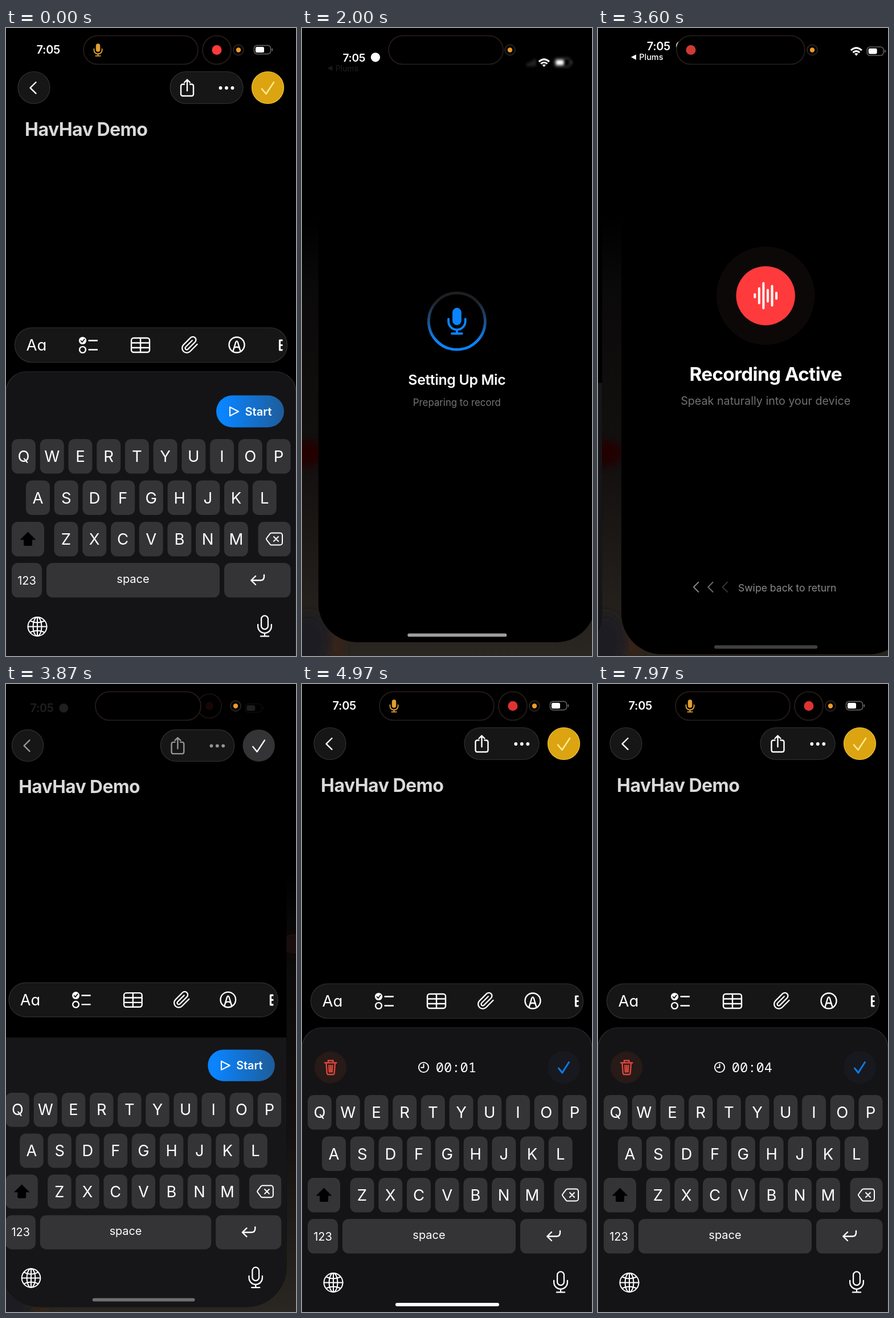
Write an HTML page that moves like this. It is 509 px wide and 1100 px high and loops after 8000 ms.

```html
<!DOCTYPE html>
<html lang="en">
<head>
<meta charset="utf-8">
<title>Voice keyboard demo</title>
<style>
  html, body { margin: 0; width: 100%; height: 100%; overflow: hidden; background: #000; }
  svg { position: fixed; inset: 0; width: 100%; height: 100%; display: block; }
  text { font-family: Inter, "Noto Sans", sans-serif; fill: #fff; }
  .line { fill: none; stroke: #fff; stroke-width: 2.4; stroke-linecap: round; stroke-linejoin: round; }
  .glass { fill: #161616; stroke: #303030; stroke-width: 1.2; }
  .time { font-size: 20px; font-weight: 600; letter-spacing: -.3px; }
  .mid { text-anchor: middle; }
  .key { fill: #343437; }
  .letter { font-size: 27.5px; text-anchor: middle; }
  .pod { fill: #000; stroke: #231918; stroke-width: 2; }
</style>
</head>
<body>
<svg viewBox="0 0 509 1100">
  <defs>
    <clipPath id="screenClip"><rect id="screenRect" width="509" height="1100"/></clipPath>
    <linearGradient id="wall" x2="0" y2="1">
      <stop offset=".3" stop-color="#000"/><stop offset=".42" stop-color="#0b0a0a"/>
      <stop offset=".72" stop-color="#141110"/><stop offset="1" stop-color="#2a2621"/>
    </linearGradient>
    <linearGradient id="blue">
      <stop offset=".1" stop-color="#0a84ff"/><stop offset="1" stop-color="#1e5c99"/>
    </linearGradient>
    <linearGradient id="spin" x2="0" y2="1">
      <stop offset=".12" stop-color="#1f1f21"/><stop offset=".5" stop-color="#1c4f86"/>
      <stop offset=".85" stop-color="#0a84ff"/>
    </linearGradient>
    <filter id="soft" x="-50%" y="-50%" width="200%" height="200%"><feGaussianBlur stdDeviation="8"/></filter>

    <g id="battery">
      <rect x="435.5" y="30.5" width="29" height="15" rx="5" fill="none" stroke="#6c6c6c" stroke-width="1.4"/>
      <rect x="438" y="33" width="15" height="10" rx="2.5" fill="#fff"/>
      <rect x="466.3" y="35.5" width="1.8" height="5" rx="1" fill="#6c6c6c"/>
    </g>
    <rect id="bar" x="164" y="1084" width="182" height="6" rx="3" fill="#fff"/>
  </defs>

  <rect width="509" height="1100" fill="#000"/>
  <g id="wallpaper">
    <rect width="509" height="1100" fill="url(#wall)"/>
    <g filter="url(#soft)">
      <ellipse cx="0" cy="745" rx="45" ry="24" fill="#210605"/>
      <ellipse cx="508" cy="455" rx="24" ry="18" fill="#1e0a0a"/>
      <ellipse cx="12" cy="1075" rx="36" ry="50" fill="#1b1d22"/>
      <ellipse cx="63" cy="1080" rx="9" ry="30" fill="#3a2216"/>
    </g>
  </g>

  <g id="editor" clip-path="url(#screenClip)">
    <rect width="509" height="1100" fill="#000"/>
    <g id="editorStatus">
      <text class="time" x="53.5" y="45">7:05</text>
      <circle id="focusDot" cx="113" cy="38" r="8" fill="#fff"/>
      <use href="#battery"/>
    </g>
    <circle class="glass" cx="49" cy="104.5" r="28"/>
    <rect id="pill" class="glass" x="288" y="76.5" width="128" height="56" rx="28"/>
    <g id="topIcons">
      <path class="line" d="M52.5 95 42.5 104.8 52.5 114.6"/>
      <path id="share" class="line" d="M313 98.5h-3a3 3 0 0 0-3 3V116a3 3 0 0 0 3 3h16a3 3 0 0 0 3-3V101.5a3 3 0 0 0-3-3h-3M318 110V91M313 95.5l5-5 5 5"/>
      <g id="dots" fill="#fff">
        <circle cx="376.5" cy="105" r="2.9"/><circle cx="387" cy="105" r="2.9"/><circle cx="397.5" cy="105" r="2.9"/>
      </g>
    </g>
    <g id="greyCheck">
      <circle cx="459.5" cy="104.5" r="28.5" fill="#343436"/>
      <path class="line" d="M449 106.5l7.5 9L470 95"/>
    </g>
    <g id="goldCheck">
      <circle cx="459.5" cy="104.5" r="28" fill="#dba410" stroke="#efc343" stroke-width="1.2"/>
      <path class="line" d="M449 106.5l7.5 9L470 95" style="stroke:#ffed9c"/>
    </g>
    <text x="33" y="188.5" font-size="32" font-weight="700" letter-spacing="-.5" style="fill:#d9d9d9">HavHav Demo</text>
    <rect id="caret" x="34.5" y="202" width="3" height="30" rx="1.5" fill="#cf962c"/>

    <rect class="glass" x="15.5" y="525" width="478" height="60.5" rx="30"/>
    <text x="35.5" y="565" font-size="27.5">A&#x251;</text>
    <circle cx="134.5" cy="547.5" r="6.6" fill="#fff"/>
    <path class="line" d="M131.5 547.8l2.2 2.4 3.8-5" style="stroke:#161616;stroke-width:1.8"/>
    <circle class="line" cx="134.5" cy="563.5" r="5.4"/>
    <path class="line" d="M145.5 547.5H160M145.5 563.5H160"/>
    <path class="line" d="M224 543h24a4 4 0 0 1 4 4v17a4 4 0 0 1-4 4h-24a4 4 0 0 1-4-4v-17a4 4 0 0 1 4-4zM236 543v25M220 551.5h32M220 560h32"/>
    <path class="line" transform="translate(306.5 539) scale(1.36)" style="stroke-width:1.7"
      d="M21.4 11l-9.2 9.2a6 6 0 0 1-8.5-8.5l9.2-9.2a4 4 0 0 1 5.7 5.7l-9.2 9.2a2 2 0 0 1-2.9-2.9l8.5-8.4"/>
    <circle class="line" cx="405" cy="555" r="13.5"/>
    <path class="line" d="M398.5 566l4.7-15.5q1.8-4 3.6 0L411.5 566M401 560q4-2.5 8 0"/>
    <path class="line" d="M485.5 547H480.5V564h5M481 555.5h4.5" style="stroke-width:3.2;stroke-linecap:butt"/>

    <g id="keyboard">
      <rect id="roundPanel" x="0" y="602" width="509" height="540" rx="36" fill="#141416" stroke="#2b2b2d" stroke-width="1.2"/>
      <rect id="flatPanel" y="622" width="509" height="480" fill="#161618"/>
      <g id="start">
        <rect x="369" y="643.5" width="119" height="56" rx="28" fill="url(#blue)"/>
        <path class="line" d="M393 664l15 7.7-15 7.7z" style="stroke-width:2.1"/>
        <text x="419.5" y="679" font-size="20" font-weight="600">Start</text>
      </g>
      <g id="controls">
        <circle cx="50" cy="671.5" r="28" fill="#271a17"/>
        <path class="line" style="stroke:#d9463d" d="M40 663.5h20.5M46 663v-3.5h8.5v3.5M42.5 664l1.3 17.5q.2 2.5 2.7 2.5h7.5q2.5 0 2.7-2.5L58 664M47.3 668l.5 11.5M50.3 668v11.5M53.3 668l-.5 11.5"/>
        <circle class="line" cx="213.5" cy="671.5" r="8.6" style="stroke-width:1.9"/>
        <path class="line" d="M213.5 666v5.8h-4.5" style="stroke-width:1.9"/>
        <text id="timer" x="234.8" y="680" font-size="23.7" font-weight="500" style="font-family:'Noto Sans Mono','DejaVu Sans Mono',monospace">00:00</text>
        <circle cx="459.5" cy="671.5" r="28.5" fill="#17191f"/>
        <path class="line" d="M450.5 673l6.3 8L468.5 662.5" style="stroke:#0f7ae5;stroke-width:3"/>
      </g>
      <g id="keys"></g>
      <path d="M38.5 882.5L52.5 896.5h-6.5v8.5q0 2-2 2h-11q-2 0-2-2v-8.5h-6.5z"/>
      <path class="line" style="stroke-width:2" d="M466 884.5h15a4 4 0 0 1 4 4v13a4 4 0 0 1-4 4h-15q-1.5 0-2.5-1.2L457.5 896.5q-1.2-1.5 0-3L463.5 885.7q1-1.2 2.5-1.2zM470 891l8 8M478 891l-8 8"/>
      <path class="line" d="M453 958v3q0 6.5-6.5 6.5H430.5M438 960l-7.7 7.5 7.7 7.5"/>
      <text class="mid" x="36.5" y="974.5" font-size="20">123</text>
      <text class="mid" x="223" y="972" font-size="20">space</text>
      <g class="line" style="stroke-width:2">
        <circle cx="55" cy="1048.5" r="16.5"/><ellipse cx="55" cy="1048.5" rx="7.5" ry="16.5"/>
        <path d="M55 1032v33M38.5 1048.5h33M42.5 1038.5q12.5 6 25 0M42.5 1058.5q12.5-6 25 0"/>
      </g>
      <g id="dictate"></g>
    </g>
    <use id="editorBar" href="#bar"/>
  </g>

  <g id="recorder" clip-path="url(#screenClip)">
    <rect width="509" height="1100" fill="#000"/>
    <text class="time" x="45" y="36">7:05</text>
    <circle cx="105" cy="28.5" r="8.5" fill="#fff"/>
    <g id="backLabel">
      <path d="M17 48.5l9-4.7v9.4z" fill="#fff"/>
      <text x="31.5" y="53.8" font-size="14.5" font-weight="500">Plums</text>
    </g>
    <g id="signal" fill="#fff">
      <rect x="383" y="39" width="4" height="6"/><rect x="389" y="36" width="4" height="9"/><rect x="395" y="32" width="4" height="13"/>
    </g>
    <path fill="none" stroke="#fff" stroke-width="3.2" d="M405 36.5q9.5-8.5 19 0M408.6 40.3q5.9-5 11.8 0"/>
    <path d="M411.3 42.5q3.2-2.3 6.4 0l-3.2 3.6z" fill="#fff"/>
    <g id="recBattery"><use href="#battery" x="-2"/></g>

    <g id="setup">
      <circle id="ring" cx="254.5" cy="512" r="51.8" fill="none" stroke="url(#spin)" stroke-width="5"/>
      <g id="setupMic"></g>
      <text class="mid" x="254.5" y="628.5" font-size="26" font-weight="600" letter-spacing="-.35">Setting Up Mic</text>
      <text class="mid" x="254.5" y="667.5" font-size="17.6" style="fill:#747474">Preparing to record</text>
    </g>
    <g id="active">
      <circle id="halo" cx="254.5" cy="468.5" r="86.5" fill="#0d0808"/>
      <circle cx="254.5" cy="468.5" r="52" fill="#ff3a3c"/>
      <g id="wave" fill="#fff"></g>
      <text class="mid" x="254.5" y="618" font-size="33.5" font-weight="700" letter-spacing="-.65">Recording Active</text>
      <text class="mid" x="254.5" y="661" font-size="19.8" style="fill:#707070">Speak naturally into your device</text>
      <g id="chevrons" class="line" style="stroke-width:2"></g>
      <text x="206" y="989" font-size="17.7" style="fill:#8a8a8a">Swipe back to return</text>
    </g>
    <use id="recBar" href="#bar"/>
  </g>

  <g id="island">
    <g id="bubble">
      <circle class="pod" r="25"/><circle id="bubbleDot" r="8.5" fill="#ff3b3a"/>
    </g>
    <rect id="pod" class="pod" y="13.5" height="50" rx="25"/>
    <g id="islandMic"></g>
    <circle id="islandDot" cx="163" cy="38.5" r="8.5" fill="#d03a34"/>
    <g id="privacy">
      <circle r="9" fill="#000" stroke="#262220" stroke-width="2"/><circle r="4.2" fill="#ef9a27"/>
    </g>
  </g>
</svg>
<script>
const LOOP = 8000;
const $ = id => document.getElementById(id);
const set = (id, attrs) => { for (const k in attrs) $(id).setAttribute(k, attrs[k]); };
const fade = (id, v) => { $(id).style.opacity = v; };

// Linear interpolation through [time, value] steps.
function track(...steps) {
  return t => {
    const i = steps.findIndex(s => s[0] > t);
    if (i < 0) return steps[steps.length - 1][1];
    if (i === 0) return steps[0][1];
    const [t0, a] = steps[i - 1], [t1, b] = steps[i];
    return a + (b - a) * (t - t0) / (t1 - t0);
  };
}

function mic(id, x, y, scale, color, solid) {
  $(id).innerHTML = `<g transform="translate(${x} ${y}) scale(${scale})" fill="none" stroke="${color}"
    stroke-width="${solid ? 4 : 2.9}" stroke-linecap="round">
    <rect x="-7.5" y="-23.5" width="15" height="30" rx="7.5" ${solid ? `fill="${color}" stroke-width="1"` : ''}/>
    <path d="M-15-4v4a15 15 0 0 0 30 0v-4M0 15v7M-9 22H9"/></g>`;
}
mic('dictate', 454, 1048, .79, '#fff', false);
mic('setupMic', 254.5, 512, 1.03, '#0a84ff', true);
mic('islandMic', 161.5, 38.5, .47, '#e0a02f', true);

const key = (x, y, w) => `<rect class="key" x="${x}" y="${y}" width="${w}" height="60.5" rx="10.5"/>`;
const row = (letters, x0, y) => [...letters].map((c, i) => {
  const x = x0 + i * 49.72;
  return key(x, y, 42) + `<text class="letter" x="${x + 21}" y="${y + 40}">${c}</text>`;
}).join('');
$('keys').innerHTML = row('QWERTYUIOP', 10, 720) + row('ASDFGHJKL', 35, 792.5) + row('ZXCVBNM', 84.5, 865)
  + key(10, 865, 57) + key(442.5, 865, 57) + key(10, 937, 53) + key(71, 937, 304) + key(383, 937, 116.5);

const bars = [9, 30, 48, 24, 38, 14];
$('wave').innerHTML = bars.map((h, i) => `<rect x="${233.5 + i * 7.6}" width="4" rx="2"/>`).join('');
$('chevrons').innerHTML = [0, 1, 2].map(i => `<path d="M${136 + i * 25.5} 973l-8.5 8.5 8.5 8.5"/>`).join('');

// pan is the recorder's offset: 540 shows the editor, 0 shows the recorder.
const pan = track([1630, 540], [1690, 470], [1760, 300], [1840, 130], [1920, 52], [2000, 17.5], [2100, 5], [2250, 0],
  [3420, 0], [3520, 14], [3600, 38], [3690, 190], [3780, 420], [3830, 495], [3870, 526.5], [3960, 536], [4100, 540]);
const zoom = track([1570, 1], [1630, .994], [1790, .94], [2000, .956], [2150, .985], [2350, 1],
  [3420, 1], [3600, .995], [3730, .975], [3870, .988], [4100, 1]);
const lift = track([3600, 0], [3870, -2], [4100, 0]);
const corner = track([1560, 0], [1620, 72], [2250, 72], [2350, 0], [3410, 0], [3450, 72], [4020, 72], [4100, 0]);
const podX = track([1690, 136], [1850, 158], [2000, 152], [2250, 152], [2600, 138], [3640, 138], [3870, 157], [4150, 136]);
const podW = track([1690, 201], [1850, 190], [2000, 201], [2250, 201], [2600, 225], [3640, 225], [3870, 185], [4150, 201]);
const privacyX = track([1690, 408], [1850, 372], [2000, 365], [2250, 365], [2600, 376], [3640, 376], [3870, 403], [4150, 408]);
const bubbleX = track([1690, 370], [1850, 340], [3700, 335], [3870, 357], [4150, 370]);
const bubbleSize = track([1690, 1], [1850, .6], [3700, .6], [3870, .84], [4150, 1]);

const fades = {
  bubble: track([1700, 1], [1850, 0], [3720, 0], [3870, .8], [4050, 1]),
  bubbleDot: track([1700, 1], [1800, 0], [3800, 0], [3870, .12], [4150, .87]),
  islandMic: track([1700, 1], [1950, 0], [4000, 0], [4200, 1]),
  islandDot: track([2500, 0], [2700, 1], [3620, 1], [3780, 0]),
  editorStatus: track([1650, 1], [1850, 0], [3800, 0], [3870, .12], [4000, .3], [4200, 1]),
  focusDot: t => t > 3400 && t < 4050 ? 1 : 0,
  goldCheck: track([1700, 1], [1800, 0], [4100, 0], [4250, 1]),
  topIcons: track([1700, 1], [1800, .55], [4100, .55], [4250, 1]),
  editorBar: t => t < 3000 ? 0 : editorBarFade(t),
  recBar: track([2300, .62], [2900, .25]),
  backLabel: track([1970, 0], [2000, .1], [2250, 1]),
  signal: track([1900, .35], [2000, .2], [2200, 0]),
  setup: track([2480, 1], [2640, 0]),
  active: track([2480, 0], [2640, 1]),
  start: track([4280, 1], [4400, 0]),
  controls: track([4280, 0], [4400, 1]),
};
const editorBarFade = track([3500, .35], [3870, .38], [4230, 1], [5150, 1], [5550, 0]);
const recBlur = track([1900, 4], [2000, 2], [2200, 0]);
const blink = track([180, 0], [260, 1], [720, 1], [820, 0]);
const caret = t => t > 1700 && t < 4200 ? 0 : blink(t % 1000);

const place = (x, s, y) => `translate(${254.5 + x} ${550 + y}) scale(${s}) translate(-254.5 -550)`;

function draw(t) {
  const x = pan(t), s = zoom(t), y = lift(t);
  set('recorder', { transform: place(x, s, y), visibility: x < 540 ? 'visible' : 'hidden' });
  set('editor', { transform: place(x - 540, s, y), visibility: x > 0 ? 'visible' : 'hidden' });
  set('screenRect', { rx: corner(t) });
  fade('wallpaper', corner(t) > 0 ? 1 : 0);
  for (const id in fades) fade(id, fades[id](t));

  const returned = t > 3000;
  set('pill', { x: returned ? 285 : 288, width: returned ? 131 : 128 });
  set('share', { transform: `translate(${returned ? -2.5 : 0} 0)` });
  set('dots', { transform: `translate(${returned ? -1.2 : 0} 0)` });
  fade('greyCheck', t > 1700 && t < 4250 ? 1 : 0);
  fade('keyboard', t > 1570 && t < 3000 ? 0 : 1);
  const flat = t > 3000 && t < 4180;
  fade('flatPanel', flat ? 1 : 0);
  fade('roundPanel', flat ? 0 : 1);
  fade('caret', caret(t));
  const secs = Math.max(0, Math.floor((t - 3930) / 1000));
  $('timer').textContent = '00:' + String(secs).padStart(2, '0');

  set('ring', { transform: `rotate(${(t - 2000) * .36} 254.5 512)` });
  $('recBattery').style.filter = $('signal').style.filter = recBlur(t) ? `blur(${recBlur(t)}px)` : 'none';
  const beat = (t - 3600) / 1000;
  set('halo', { r: 86.5 + 3 * Math.sin(beat * 4) });
  [...$('wave').children].forEach((bar, i) => {
    const h = bars[i] * (1 + .3 * Math.sin(beat * (7 + i * 1.7)));
    bar.setAttribute('height', h);
    bar.setAttribute('y', 468.5 - h / 2);
  });
  [...$('chevrons').children].forEach((c, i) => {
    c.style.opacity = .32 + .2 * Math.cos(beat * 5 + i * 1.1);
  });

  set('pod', { x: podX(t), width: podW(t) });
  set('bubble', { transform: `translate(${bubbleX(t)} 38.5) scale(${bubbleSize(t)})` });
  set('privacy', { transform: `translate(${privacyX(t)} 38.5)` });
}

const begin = performance.now();
function tick() {
  draw((performance.now() - begin) % LOOP);
  requestAnimationFrame(tick);
}
tick();
</script>
</body>
</html>
```
